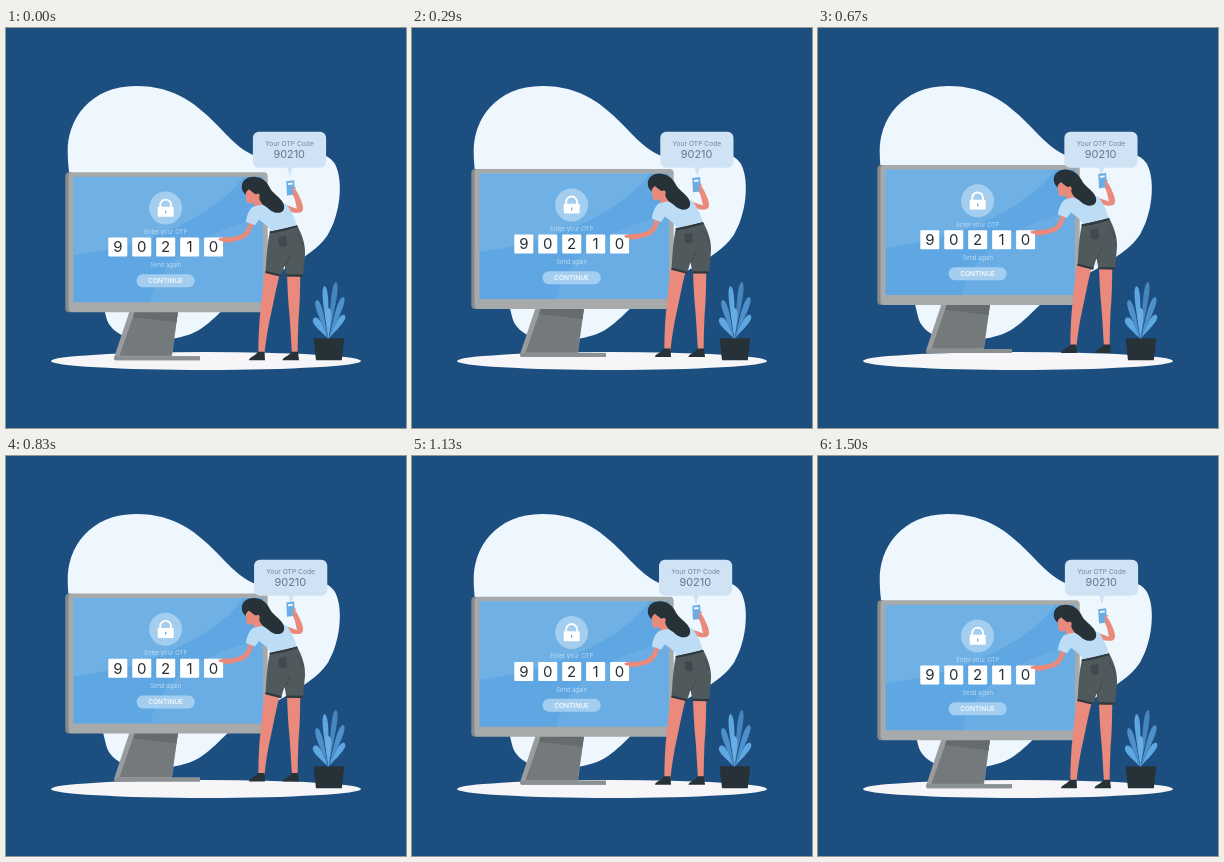
An HTML page that plays this animation: 400 px wide and 400 px high, repeating every 1540 ms.

```html
<!DOCTYPE html>
<html lang="en">
<head>
<meta charset="utf-8">
<title>OTP code entry</title>
<style>
  html, body { margin: 0; width: 100%; height: 100%; overflow: hidden; background: #1c4f80; }
  svg { display: block; width: 100vw; height: 100vh; }
  text { font-family: Inter, Lato, sans-serif; text-anchor: middle; }
</style>
</head>
<body>
<svg viewBox="0 0 400 400">
  <defs>
    <clipPath id="screen"><rect x="67.5" y="148.5" width="189.5" height="125.5"/></clipPath>
  </defs>
  <rect width="400" height="400" fill="#1c4f80"/>
  <path fill="#eef6fe" d="M61.700 124C61 92 84 58 130 58C170 58 192 77 215 101C228 115 238 124 252 129C280 136 316 114 329 136C338 153 334 188 321 208C304 232 262 248 238 263C216 280 202 301 182 307C150 317 110 315 101 292C95 270 90 240 80 200C70 175 62 155 61.700 124Z"/>
  <ellipse cx="200" cy="333" rx="155" ry="9" fill="#f6f6f8"/>

  <g id="plant">
    <path fill="#263238" d="M307.500 310.300H338.300L335.800 332.300H310Z"/>
  </g>

  <g class="float">
    <path fill="#999c9d" d="M123.500 283H172L166 328H194V332H109Q107.500 331 108.500 328Z"/>
    <path fill="#74797b" d="M129 283H172L165.500 327.500H113.500Z"/>
    <path fill="#666b6d" d="M129 283H172L170.500 294L127 289Z"/>
    <path fill="#8b9092" d="M108.500 328H194V332H109.500Q107.500 331 108.500 328Z"/>
    <rect x="59.300" y="144" width="9" height="140" rx="4" fill="#84898b"/>
    <rect x="62.500" y="144" width="199.200" height="140" rx="4" fill="#a7aaab"/>
    <g clip-path="url(#screen)">
      <rect x="67" y="148" width="191" height="127" fill="#5ea7e2"/>
      <path fill="#fff" opacity=".11" d="M67 148H238C212 184 150 217 67 227Z"/>
      <path fill="#fff" opacity=".07" d="M144 275C152 232 196 202 258 190V275Z"/>
    </g>
    <circle cx="159.600" cy="179.800" r="16.500" fill="#a3ceef"/>
    <path fill="none" stroke="#fff" stroke-width="1.900" d="M154.200 179V176.800A5.400 5.400 0 0 1 165 176.800V179"/>
    <rect x="151.700" y="178.600" width="16" height="9.900" rx=".8" fill="#fff"/>
    <path fill="none" stroke="#5ea7e2" stroke-width="1.200" stroke-linecap="round" d="M159.700 182.800V184.800"/>
    <text x="159.800" y="205.700" font-size="6.100" font-weight="300" fill="#cfe5f8">Enter your OTP</text>
    <g id="tiles"></g>
    <text x="159.600" y="239" font-size="5.900" font-weight="300" fill="#d3e8f9">Send again</text>
    <rect x="130.500" y="246.100" width="58.300" height="13" rx="6.500" fill="#a3ceef"/>
    <text x="159.600" y="254.900" font-size="6.600" font-weight="500" fill="#fff">CONTINUE</text>
  </g>

  <g id="bubble">
    <path fill="#cfe3f5" d="M281 138.500H287L284 148.500Z"/>
    <rect x="247" y="103.700" width="73.200" height="36" rx="6" fill="#cfe3f5"/>
    <text x="283.600" y="118.200" font-size="6.700" fill="#72879c">Your OTP Code</text>
    <text x="283.300" y="129.500" font-size="10.900" fill="#647789">90210</text>
  </g>

  <g class="float">
    <g fill="#e98a7c">
      <path d="M259 243L273.800 246C269.500 262 267.500 275 263.800 291C261 305 259.500 316 258.500 326H252.300C252.500 309 253 293 255 278C256 266 257 255 259 243Z"/>
      <path d="M281 246H294.300C294 262 294 276 292.500 291C292 305 291.700 316 291.700 326H286C285 312 284.500 299 283.500 287C282 273 281.500 260 281 246Z"/>
      <path d="M278 176L291 180.500C289.500 174 289 170 287 167L284.500 162L288.500 160C291 163 293 167 295 172C297 177 298.500 182 295 184C291 185.500 285 184 280 182Z"/>
    </g>
    <g fill="#263238">
      <path d="M243 332C243 329 249 328 252 323.500H258.500L259 332Z"/>
      <path d="M276.500 332C276.500 329 283 328 285.500 323.500H292L293 332Z"/>
    </g>
    <path fill="#505a5d" d="M264 203L291 197C296 206 299.500 216 299 226L297 248.500L280.500 248L278.500 237L275 248.500L259.500 244.500C260.500 231 261 216 264 203Z"/>
    <path fill="none" stroke="#3f494d" stroke-width=".8" d="M278.500 238Q283 232 284 226M291 205Q295 210 297 218"/>
    <path fill="#40494d" d="M272.500 209L280 207.500L281 217Q277 220.500 273 217Z"/>
    <path fill="none" stroke="#30393e" stroke-width="2.200" d="M263.700 204.300Q278 202.300 291.300 197.800M259.500 243.700L275.400 247.600M280.200 247.200L297.200 247.400"/>
    <path fill="none" stroke="#e98a7c" stroke-width="4.800" stroke-linecap="round" stroke-linejoin="round" d="M245.500 192C244.500 200 241.500 206.500 235 209C229 211 225 211.600 219 211.800"/>
    <path fill="#e98a7c" d="M224 209.500L216.500 209.200L212.300 210.500L213 212.300L217 213L221 214.700L227 213.500Z"/>
    <path fill="#e98a7c" d="M240 161C239 166 240 170 241 174Q244 176.500 247.500 174L249 181H260L256 160Z"/>
    <path fill="#bddcf5" d="M247 178.500C257 175.500 272 173.500 280 175.500C286 183 289 190 290.500 197L264.500 203C263 198 258 195.500 253 191.500L249 197L239.800 193.500C241 187 243 181 247 178.500Z"/>
    <path fill="#263238" d="M235.800 157.500C236.500 151 243 148 249 148.600C256 149.300 260.500 153 263.300 158.500C266 165 274 168.500 277 174.500C279.500 179 278 184 273.500 184.500C266 185.500 263 180 258.500 177.500C255 175.500 253 171 252.500 166.500C249 166.500 246 163.500 243 161C241 163 239 164 240 167C237 164 235.300 161 235.800 157.500Z"/>
    <ellipse cx="251.800" cy="167.800" rx="1.900" ry="2.600" fill="#e98a7c"/>
    <path fill="#69ade4" d="M280.300 153L288.100 152L288.900 166.300L281 167.200Z"/>
    <path fill="#eef6fe" d="M281.900 154.900L286.600 154.300L286.800 156.300L282 156.900Z"/>
    <path fill="none" stroke="#e98a7c" stroke-width="1.700" stroke-linecap="round" d="M289 159.500L287 162M289.200 163L287.200 165.200"/>
  </g>
</svg>
<script>
const make = (parent, tag, attrs, label = '') => {
  const el = document.createElementNS('http://www.w3.org/2000/svg', tag);
  for (const key in attrs) el.setAttribute(key, attrs[key]);
  el.textContent = label;
  parent.append(el);
};

const tiles = document.getElementById('tiles');
[...'90210'].forEach((digit, i) => {
  const x = 102.3 + 23.95 * i;
  make(tiles, 'rect', { x, y: 209.3, width: 19, height: 19, rx: 1, fill: '#fff' });
  make(tiles, 'text', { x: x + 9.5, y: 224.2, 'font-size': 15, 'font-weight': 400, fill: '#263238' }, digit);
});

const plant = document.getElementById('plant');
const leaf = (tipX, tipY, width, fill) => {
  const x = 322.5, y = 311;
  const dx = tipX - x, dy = tipY - y, len = Math.hypot(dx, dy);
  const nx = -dy / len * width, ny = dx / len * width;
  const side = s => [
    `${x + dx * 0.4 + nx * s * 0.2} ${y + dy * 0.4 + ny * s * 0.2}`,
    `${x + dx * 0.95 + nx * s} ${y + dy * 0.95 + ny * s}`
  ];
  const [a, b] = side(1), [c, d] = side(-1);
  make(plant, 'path', { fill, d: `M${x} ${y}C${a} ${b} ${tipX} ${tipY}C${d} ${c} ${x} ${y}Z` });
};
leaf(330, 254, 5.5, '#4685bd');
leaf(337.5, 269, 6, '#4d90cb');
leaf(338.5, 287, 6, '#5ea7e2');
leaf(318.5, 258, 5.5, '#5ea7e2');
leaf(310.5, 272, 6, '#4d90cb');
leaf(308, 290, 7, '#5ea7e2');
leaf(322.5, 280, 6, '#69ade4');

const LOOP = 1540, CYCLE = 1500, LEAD = 20, SCALE = 0.8, BASE = 0.4;
const SHAKE = [0, -1, 2, -4, 4, -4, 4, -4, 2, -1, 0];
const floats = document.querySelectorAll('.float');
const bubble = document.getElementById('bubble');

function draw(ms) {
  const p = ((ms % LOOP) + LEAD) % CYCLE / CYCLE;
  const lift = BASE - 10 * SCALE * (1 - Math.abs(1 - 2 * p));
  const i = Math.floor(p * 10);
  const shift = SCALE * (SHAKE[i] + (SHAKE[i + 1] - SHAKE[i]) * (p * 10 - i));
  floats.forEach(el => el.setAttribute('transform', `translate(0 ${lift})`));
  bubble.setAttribute('transform', `translate(${shift} 0)`);
}

let start;
function tick(now) {
  start ??= now;
  draw(now - start);
  requestAnimationFrame(tick);
}
draw(0);
requestAnimationFrame(tick);
</script>
</body>
</html>
```
